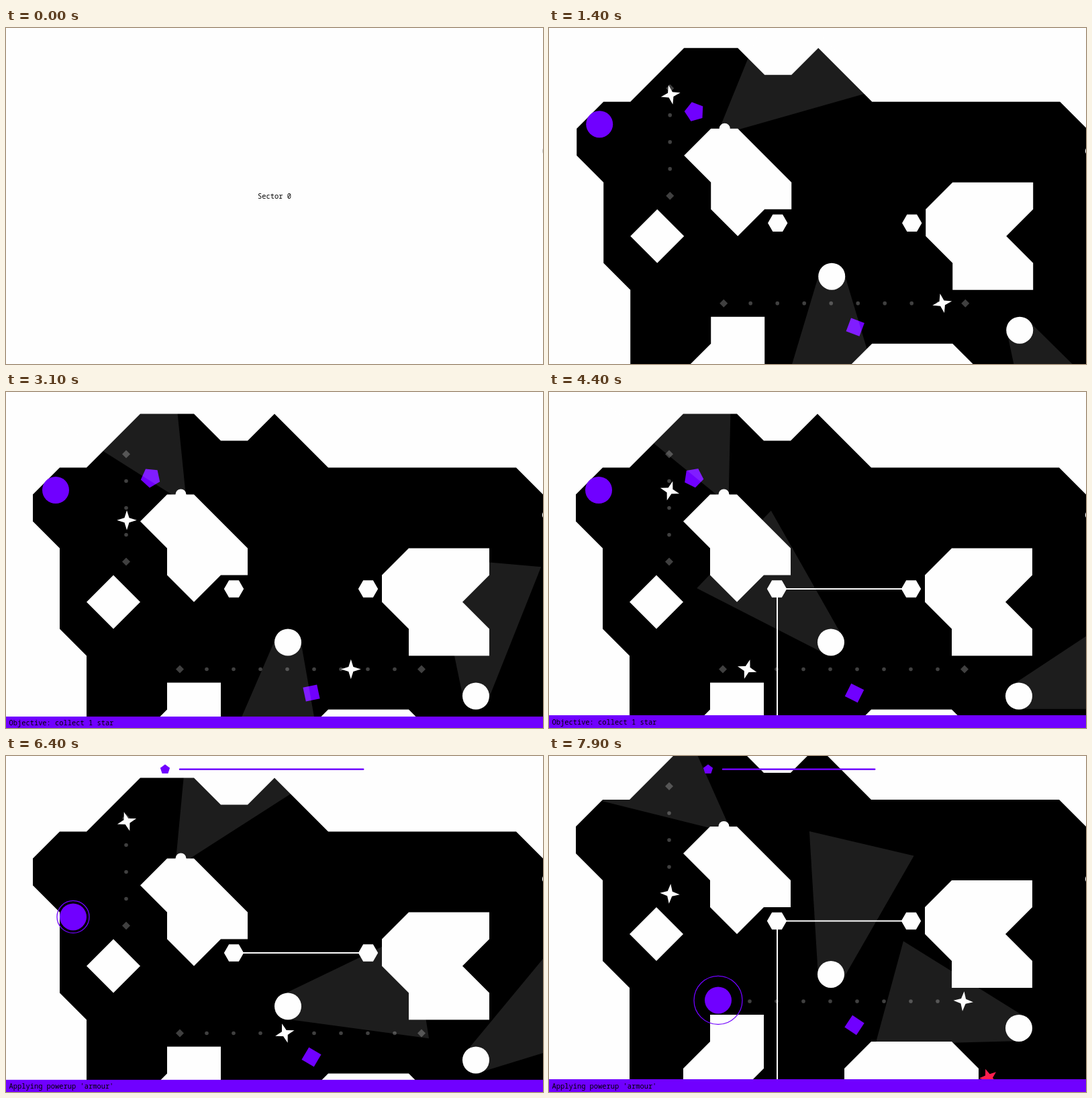
An HTML page with a canvas for the animation above (8 s loop, 800 by 500 pixels).

```html
<!DOCTYPE html>
<html lang="en">
<head>
<meta charset="utf-8">
<title>Sector 0</title>
<style>
  html, body { margin: 0; width: 100%; height: 100%; overflow: hidden; background: #fefefe; }
  canvas { display: block; }
</style>
</head>
<body>
<canvas id="stage" width="800" height="500"></canvas>
<script>
const ctx = document.getElementById('stage').getContext('2d');
const LOOP = 8, TAU = Math.PI * 2, RAD = Math.PI / 180, CELL = 40, TOP = 32;
const WHITE = '#fefefe', PURPLE = '#7000ff', RED = '#ff1f4f', GREY = '#404040';
const START = 0.5, PICKUP = 5.45, SPIN = -178;
const FONT = '10.4px "Noto Sans Mono", "DejaVu Sans Mono", monospace';

// Walk the grid from a cell by compass steps, e.g. "NE2" is two cells up and right
function walk(col, row, steps) {
  const points = [[col, row]];
  for (const [, dir, n] of steps.matchAll(/([NSEW]+)(\d*)/g)) {
    const len = +n || 1;
    col += len * (dir.includes('E') - dir.includes('W'));
    row += len * (dir.includes('S') - dir.includes('N'));
    points.push([col, row]);
  }
  return points.map(([c, r]) => [c * CELL, TOP + r * CELL]);
}

const cave = walk(1, 3, 'NE E NE2 E2 SE E NE SE2 E7 SE2 S11 W18 N6 NW N3 NW');
const blocks = [
  walk(6, 3, 'E SE2 S W SW NW N NW'),
  walk(4, 6, 'SE SW NW'),
  walk(15, 5, 'E3 S SW SE S W3 N NW N'),
  walk(6, 10, 'E2 S2 SW W2 N NE'),
  walk(12, 11, 'E3 SE S2 W5 N2')
];

// Eased change of the given amount, beginning at start
function shift(t, start, time, amount) {
  const u = Math.min(1, Math.max(0, (t - start) / time));
  return amount * u * u * (3 - 2 * u);
}

const settle = dt => Math.exp(-3.47 * dt);

function poly(points, color) {
  ctx.fillStyle = color;
  ctx.beginPath();
  for (const [x, y] of points) ctx.lineTo(x, y);
  ctx.closePath();
  ctx.fill();
}

function disc(x, y, r, color) {
  ctx.fillStyle = color;
  ctx.beginPath();
  ctx.arc(x, y, r, 0, TAU);
  ctx.fill();
}

// Regular polygon, or a star when an inner radius is given
function ngon(x, y, n, r, deg, color, inner) {
  const points = [], count = inner ? n * 2 : n;
  for (let i = 0; i < count; i++) {
    const a = deg * RAD + i * TAU / count, d = inner && i % 2 ? inner : r;
    points.push([x + d * Math.cos(a), y + d * Math.sin(a)]);
  }
  poly(points, color);
}

function line(x1, y1, x2, y2, color, width, cap = 'butt') {
  ctx.strokeStyle = color;
  ctx.lineWidth = width;
  ctx.lineCap = cap;
  ctx.beginPath();
  ctx.moveTo(x1, y1);
  ctx.lineTo(x2, y2);
  ctx.stroke();
}

function beam(x, y, deg, near, far) {
  ctx.save();
  ctx.translate(x, y);
  ctx.rotate(deg * RAD);
  poly([[0, -near], [200, -far], [200, far], [0, near]], 'rgba(255,255,255,0.115)');
  ctx.restore();
}

function track(x, y, dx, dy, steps) {
  for (let i = 0; i <= steps; i++) {
    const px = x + dx * i, py = y + dy * i;
    if (i % steps) disc(px, py, 2.8, GREY);
    else ngon(px, py, 4, 6, 0, GREY);
  }
}

function drawTitle(t) {
  ctx.fillStyle = '#000';
  ctx.font = '500 ' + FONT;
  ctx.textAlign = 'center';
  ctx.fillText('Sector 0', 400, 254);
  if (t >= 0.2) ctx.fillRect(425, 244, 6, 12);
  disc(806, 183, 7.2, '#ccc');
}

function drawItems(t) {
  const spin = SPIN * t;
  if (t < PICKUP) ngon(215.5, 127, 5, 15, spin, PURPLE);
  ngon(455, 447.5, 4, 15, spin + 45, PURPLE);
  ngon(655, 526, 5, 14, spin, RED, 6);
}

function drawBeams(t) {
  const left = 90 + shift(t, 2.8, 3.15, 261) - shift(t, 6.85, 3.15, 261);
  const right = 90 - shift(t, 0.9, 1.95, 175) + shift(t, 3.1, 2, 95) - shift(t, 5.45, 3.15, 200);
  beam(420, 372, left, 20, 80);
  beam(700, 452, right, 20, 80);
  beam(260.5, 152, -90 + 50 * Math.sin(0.55 + 1.49 * (t - 0.9)), 8, 105.5);
}

function drawLasers(t) {
  const beat = t + 0.35;
  if (beat % 2 < 1) line(340, 292.5, 540, 292.5, WHITE, 2);
  if (beat % 4 < 1) line(340, 292.5, 340, 640, WHITE, 2);
  for (const x of [339.5, 539.5]) ngon(x, 292.5, 6, 14.7, 0, WHITE);
}

function drawHazards(t) {
  const tilt = 17 * Math.sin(1.37 * (t - 3.1));
  const star = (x, y) => ngon(x, y, 4, 14.8, tilt, WHITE, 5);
  star(180, 172 + 80 * Math.cos(2.344 * (t - 7.89)));
  star(439 + 180 * Math.cos(1.042 * (t - 2.005)), 412);
}

function drawPlayer(t) {
  const x = 74 + shift(t, 4.7, 0.8, 110) - shift(t, 5.5, 0.9, 84) + shift(t, 6.9, 1, 152);
  const y = 145.5 + shift(t, 5.4, 2.5, 265);
  disc(x, y, 20, PURPLE);
  if (t < PICKUP) return;
  ctx.strokeStyle = PURPLE;
  ctx.lineWidth = 1.3;
  ctx.beginPath();
  ctx.arc(x, y, 30 - 6 * Math.cos(TAU * (t - 6.4)), 0, TAU);
  ctx.stroke();
}

function drawWorld(t) {
  const drift = settle(t - START);
  const scroll = 47.5 * Math.pow(Math.max(0, (t - 6.8) / 1.1), 1.4);
  ctx.save();
  ctx.translate(28 * drift, 0.5 - 65 * drift - scroll);
  poly(cave, '#000');
  track(179, 92, 0, CELL, 4);
  track(259, 412, CELL, 0, 9);
  drawItems(t);
  drawBeams(t);
  for (const b of blocks) poly(b, WHITE);
  disc(420, 372, 20, WHITE);
  disc(700, 452, 20, WHITE);
  disc(260.5, 152, 8, WHITE);
  drawLasers(t);
  drawHazards(t);
  drawPlayer(t);
  ctx.restore();
}

function drawMessage(t, from, text) {
  const y = 481 + 19 * settle(t - from);
  ctx.fillStyle = PURPLE;
  ctx.fillRect(0, y, 800, 20);
  ctx.fillStyle = '#000';
  ctx.font = FONT;
  ctx.textAlign = 'left';
  ctx.fillText(text, 4.5, y + 13.5);
}

function drawHud(t) {
  disc(806, 183, 7.2, WHITE);
  if (t >= PICKUP) {
    ngon(237, 20, 5, 7.5, -90, PURPLE);
    line(259, 19.7, 562 - 31.33 * (t - PICKUP), 19.7, PURPLE, 2.5, 'round');
  }
  if (t >= 5.5) drawMessage(t, 5.5, "Applying powerup 'armour'");
  else if (t >= 2.45) drawMessage(t, 2.45, 'Objective: collect 1 star');
}

function draw(t) {
  ctx.fillStyle = WHITE;
  ctx.fillRect(0, 0, 800, 500);
  if (t < START) drawTitle(t);
  else {
    drawWorld(t);
    drawHud(t);
  }
}

const begin = performance.now();
function tick() {
  draw((performance.now() - begin) / 1000 % LOOP);
  requestAnimationFrame(tick);
}
tick();
</script>
</body>
</html>
```
